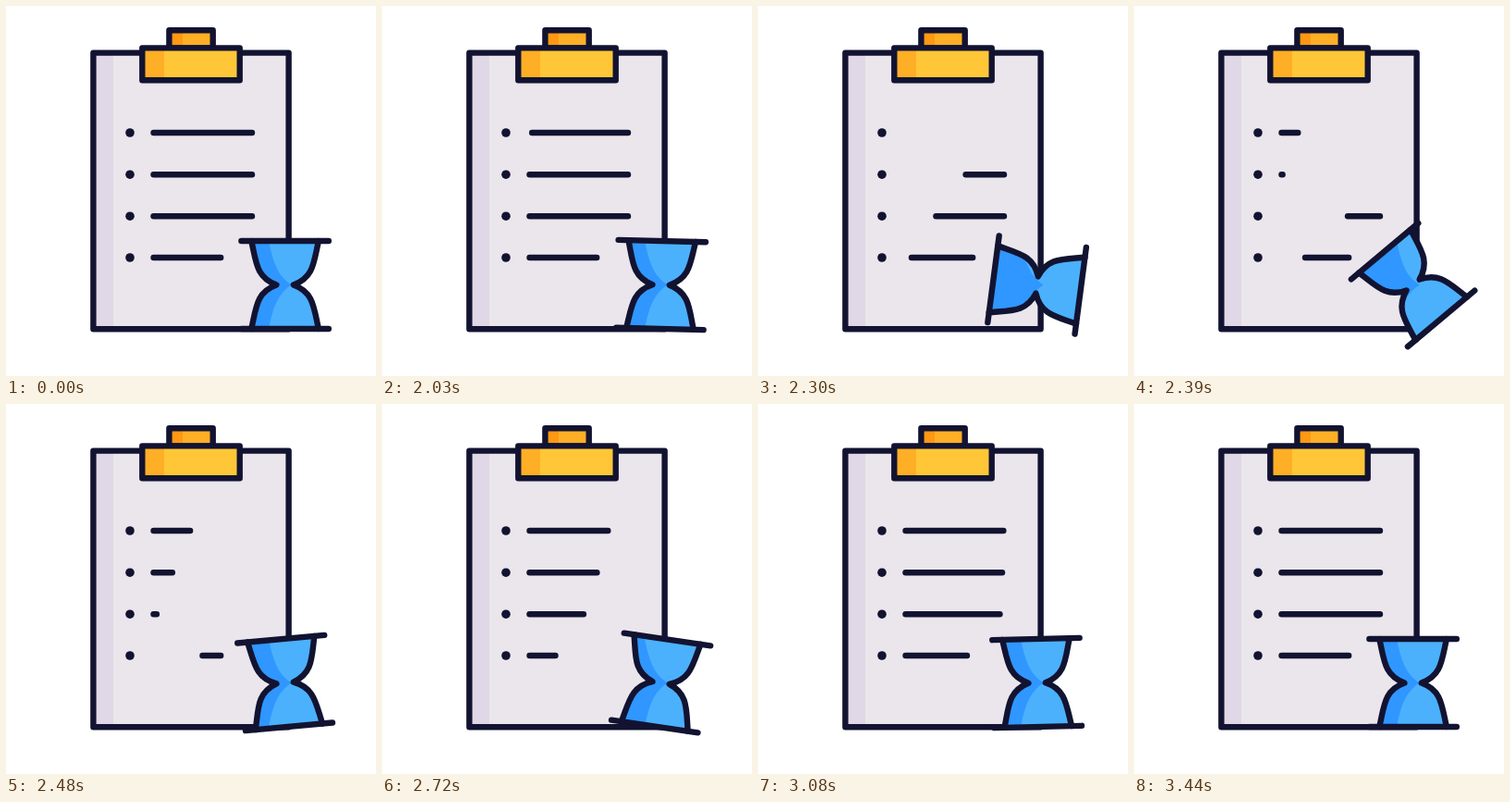
An HTML page with a canvas for the animation above (3470 ms loop, 400x400 px).

```html
<!DOCTYPE html>
<html lang="en">
<head>
<meta charset="utf-8">
<title>Checklist and hourglass</title>
<style>
  html, body { margin: 0; width: 100%; height: 100%; overflow: hidden; background: #fff; }
  canvas { display: block; width: 400px; height: 400px; }
</style>
</head>
<body>
<canvas id="stage"></canvas>
<script>
const SIZE = 400, LOOP = 3470, MOVE_START = 2000, TICK = 30;
const INK = '#121331', PAPER = '#ebe6ec', PAPER_SHADE = '#e0d8e7';
const YELLOW = '#ffc738', ORANGE = '#ffaf25', DEEP_ORANGE = '#ff9813';
const BLUE = '#4bb1fd', DEEP_BLUE = '#2f97ff';

const canvas = document.getElementById('stage');
const ctx = canvas.getContext('2d');
const ratio = window.devicePixelRatio || 1;
canvas.width = canvas.height = SIZE * ratio;

const clamp = v => Math.min(1, Math.max(0, v));
const smooth = u => u * u * (3 - 2 * u);
const easeIn = u => Math.pow(u, 1.6);
const easeOut = u => 1 - Math.pow(1 - Math.pow(u, 1.3), 4.2);

// [tick, degrees]
const turnKeys = [[0, 0], [20, 195], [30, 176], [40, 180]];

// y, right end, delay in ticks
const rows = [
  [137, 266, 0],
  [182.2, 266, 2.65],
  [227.2, 266, 5.2],
  [272, 232.2, 7.8]
];
const ROW_LEFT = 159.5, ERASE = 10, WRITE = 34;

function turnAt(tick) {
  for (let i = 1; i < turnKeys.length; i++) {
    const [t0, a0] = turnKeys[i - 1], [t1, a1] = turnKeys[i];
    if (tick < t1) return a0 + (a1 - a0) * smooth((tick - t0) / (t1 - t0));
  }
  return 180;
}

function line(x1, y1, x2, y2) {
  ctx.beginPath();
  ctx.moveTo(x1, y1);
  ctx.lineTo(x2, y2);
  ctx.stroke();
}

function shadedBox(x1, y1, x2, y2, fill, shade, shadeRight) {
  ctx.fillStyle = fill;
  ctx.fillRect(x1, y1, x2 - x1, y2 - y1);
  ctx.fillStyle = shade;
  ctx.fillRect(x1, y1, shadeRight - x1, y2 - y1);
  ctx.strokeRect(x1, y1, x2 - x1, y2 - y1);
}

function drawRow([y, right, delay], tick) {
  ctx.fillStyle = INK;
  ctx.beginPath();
  ctx.arc(134, y, 4.8, 0, Math.PI * 2);
  ctx.fill();

  const length = right - ROW_LEFT, local = tick - delay;
  if (tick === 0 || local < ERASE) {
    line(ROW_LEFT + length * easeIn(clamp(local / ERASE)), y, right, y);
  } else if (local > ERASE) {
    line(ROW_LEFT, y, ROW_LEFT + length * easeOut(clamp((local - ERASE) / WRITE)), y);
  }
}

// One glass wall; side is -1 for left, 1 for right
function wall(path, side, dir) {
  path.bezierCurveTo(side * 31, dir * 24, side * 31, dir * 8, side * 9.2, 0);
  path.bezierCurveTo(side * 31, dir * -8, side * 31, dir * -24, side * 36.3, dir * -47.5);
}

function drawHourglass(degrees) {
  const body = new Path2D(), walls = new Path2D();
  body.moveTo(-36.3, -47.5);
  wall(body, -1, -1);
  body.lineTo(36.3, 47.5);
  wall(body, 1, 1);
  body.closePath();
  for (const side of [-1, 1]) {
    walls.moveTo(side * 36.3, -47.5);
    wall(walls, side, -1);
  }

  const angle = degrees * Math.PI / 180;
  ctx.save();
  ctx.translate(301.6, 301.5);

  // The shade stays still while the glass turns around it
  ctx.save();
  ctx.rotate(angle);
  ctx.clip(body);
  ctx.rotate(-angle);
  ctx.fillStyle = BLUE;
  ctx.fillRect(-80, -80, 160, 160);
  ctx.fillStyle = DEEP_BLUE;
  ctx.beginPath();
  ctx.moveTo(-80, -80);
  ctx.lineTo(-18, -80);
  ctx.lineTo(-18, -50);
  ctx.bezierCurveTo(-13, -24, -8, -10, 7, 0);
  ctx.bezierCurveTo(-8, 10, -13, 24, -18, 50);
  ctx.lineTo(-18, 80);
  ctx.lineTo(-80, 80);
  ctx.fill();
  ctx.restore();

  ctx.rotate(angle);
  ctx.stroke(walls);
  line(-47.2, -47.5, 47.2, -47.5);
  line(-47.2, 47.5, 47.2, 47.5);
  ctx.restore();
}

function draw(ms) {
  const tick = Math.max(0, Math.floor((ms - MOVE_START) / TICK));
  ctx.setTransform(ratio, 0, 0, ratio, 0, 0);
  ctx.fillStyle = '#fff';
  ctx.fillRect(0, 0, SIZE, SIZE);
  ctx.strokeStyle = INK;
  ctx.lineWidth = 6.4;
  ctx.lineCap = ctx.lineJoin = 'round';

  shadedBox(94.4, 50.6, 305.6, 349.2, PAPER, PAPER_SHADE, 116);
  shadedBox(176.4, 26.2, 223.7, 45.4, ORANGE, DEEP_ORANGE, 191);
  shadedBox(147.3, 45.4, 252.7, 80.2, YELLOW, ORANGE, 171);
  rows.forEach(row => drawRow(row, tick));
  drawHourglass(turnAt(tick));
}

const start = performance.now();
function frame() {
  draw((performance.now() - start) % LOOP);
  requestAnimationFrame(frame);
}
frame();
</script>
</body>
</html>
```
